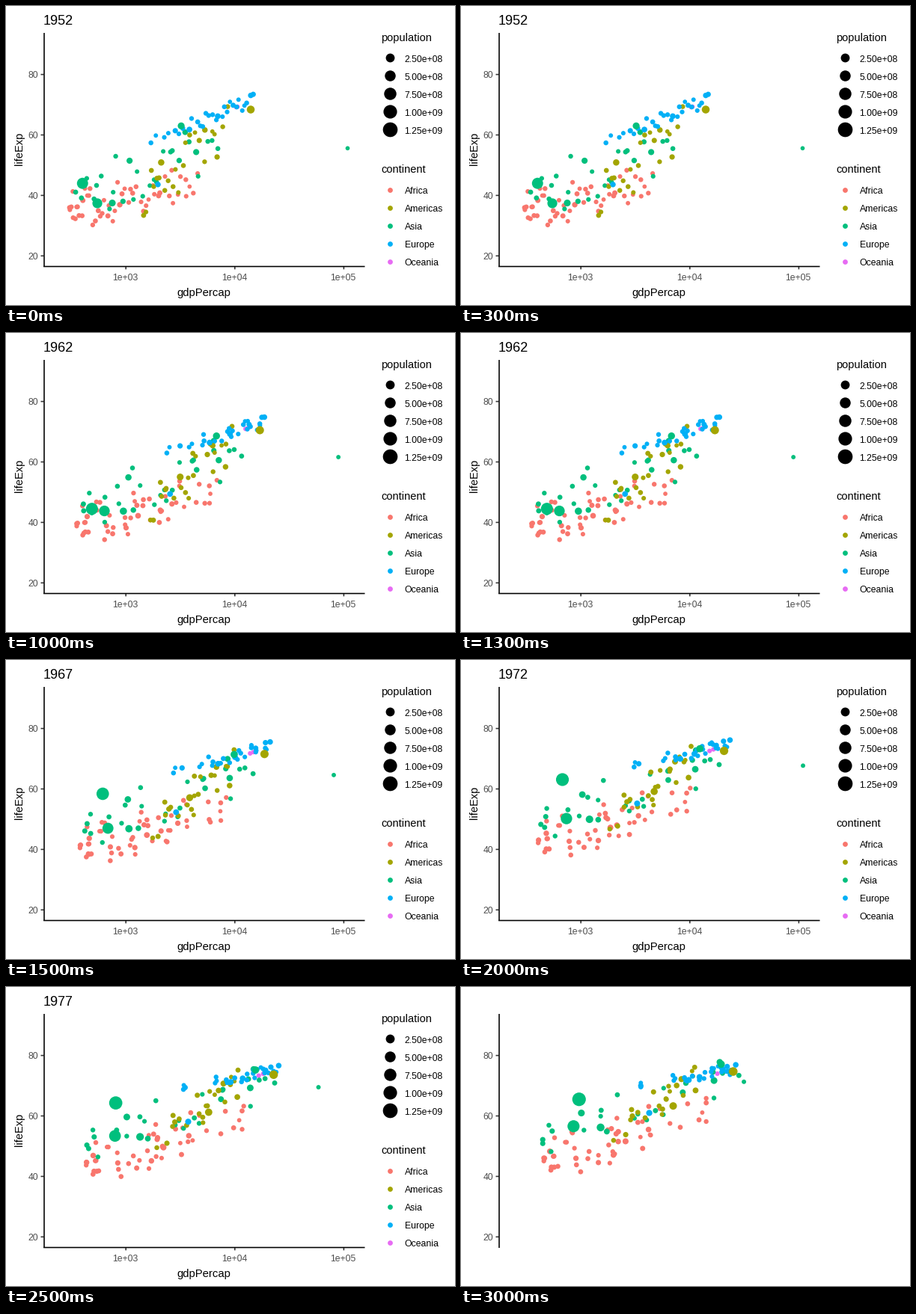
Recreate the animation shown at these times as a matplotlib script. Size 600 by 400 pixels, loop 3500 ms.

```python
import numpy as np
import matplotlib.pyplot as plt
from matplotlib.animation import FuncAnimation

W, H, DPI = 600, 400, 100
STEPS, STEP_MS = 7, 500
PT = 72 / DPI  # points per pixel

plt.rcParams["font.family"] = "Liberation Sans"
rng = np.random.default_rng(21)

COLORS = {
    "Africa": "#F8766D",
    "Americas": "#A3A500",
    "Asia": "#00BF7D",
    "Europe": "#00B0F6",
    "Oceania": "#E76BF3",
}


def to_x(log_income):
    return 160.2 + 145.6 * (log_income - 3)


def to_y(life):
    return 334.3 - 4.045 * (life - 20)


def radius(millions):
    return 2.75 + 0.2 * np.sqrt(millions)


def area(r):
    return (2 * r * PT) ** 2


def blend(start, end, power=1.0):
    """Ease from start to end, one row per step."""
    t = np.linspace(0, 1, STEPS)[:, None]
    return start + (end - start) * (1 - (1 - t) ** power)


groups = []  # (log income, life, millions, colour)


def add_cloud(name, count, before, after, skew, growth, power=1.1):
    """Spread dots along a rising band that drifts from before to after.

    A band is (lowest log income, highest, lowest life, highest, scatter).
    """
    rank = (np.arange(count) + rng.random(count)) / count
    final_rank = np.clip(rank + rng.normal(0, 0.1, count), 0, 1)
    luck = np.clip(rng.normal(0, 1, count), -1.8, 1.8)

    def place(band, u):
        low, high, short, long, scatter = band
        wealth = u ** skew
        return (low + (high - low) * wealth,
                short + (long - short) * wealth + scatter * luck)

    g0, l0 = place(before, rank)
    g1, l1 = place(after, final_rank)
    pop = np.minimum(rng.lognormal(1.5, 1, count), 45)
    order = rng.permutation(count)
    groups.append((blend(g0, g1, power)[:, order],
                   blend(l0, l1, power)[:, order],
                   blend(pop, pop * growth)[:, order], COLORS[name]))


def add_path(name, keys, pop):
    """One country moving through (step, income, life) key points."""
    step, income, life = np.array(keys).T
    at = np.arange(STEPS)
    groups.append((np.interp(at, step, np.log10(income))[:, None],
                   np.interp(at, step, life)[:, None],
                   np.linspace(*pop, STEPS)[:, None], COLORS[name]))


add_cloud("Oceania", 2, (4.0, 4.03, 69.1, 69.4, 0),
          (4.24, 4.3, 73.8, 74.7, 0), 1, 1.5)
add_cloud("Africa", 52, (2.48, 3.68, 36, 44, 4),
          (2.66, 4.15, 46, 62, 4.5), 1.4, 2)
add_cloud("Asia", 28, (2.52, 3.85, 38, 55, 6),
          (2.65, 4.45, 52, 73, 4.2), 1, 1.8)
add_cloud("Americas", 23, (3.15, 3.95, 43, 62, 5.5),
          (3.3, 4.15, 57, 74, 3), 1.1, 1.8)
add_cloud("Europe", 29, (3.15, 4.17, 56, 72, 1.3),
          (3.55, 4.45, 69.5, 76, 1), 0.65, 1.17, 1.5)

add_path("Asia", [(0, 750, 37.5), (6, 1517, 56.2)], (82, 153))
add_path("Asia", [(0, 400, 44), (1, 576, 50.5), (2, 488, 44.5),
                  (3, 613, 58.4), (4, 677, 63.1), (6, 962, 65.5)],
         (556, 1000))
add_path("Asia", [(0, 547, 37.4), (6, 856, 56.6)], (372, 708))
add_path("Asia", [(0, 3217, 63), (3, 9848, 71.4), (6, 19384, 77.1)],
         (86, 118))
add_path("Asia", [(0, 108382, 55.6), (3, 80895, 64.6), (4, 109348, 67.7),
                  (6, 31354, 71.3)], (0.2, 1.5))
add_path("Europe", [(0, 1969, 43.6), (6, 4241, 61)], (22, 47))
add_path("Americas", [(0, 2109, 50.9), (6, 7031, 63.3)], (57, 128))
add_path("Americas", [(0, 13990, 68.4), (6, 25010, 74.7)], (158, 232))

log_income, life, millions = (np.hstack([g[k] for g in groups])
                              for k in range(3))
dot_colors = [g[3] for g in groups for _ in range(g[0].shape[1])]
dot_x, dot_y, dot_area = to_x(log_income), to_y(life), area(radius(millions))

fig = plt.figure(figsize=(W / DPI, H / DPI), dpi=DPI, facecolor="white")
ax = fig.add_axes([0, 0, 1, 1])
ax.set_xlim(0, W)
ax.set_ylim(H, 0)
ax.axis("off")

fading = []  # everything missing from the last step


def label(x, y, text, px, color="black", **kw):
    return ax.text(x, y, text, fontsize=px * PT, color=color,
                   **{"va": "baseline", **kw})


def line(xs, ys, color="black"):
    return ax.plot(xs, ys, color=color, lw=1.6 * PT, snap=False,
                   solid_capstyle="butt")[0]


def dot(x, y, r, color):
    return ax.scatter([x], [y], s=area(r), c=[color], linewidths=0)


GREY, TICK = "#4D4D4D", "#333333"

for value in (20, 40, 60, 80):
    y = to_y(value)
    line([46.5, 50.5], [y, y], TICK)
    label(43, y + 4.7, str(value), 12.2, GREY, ha="right")
line([51, 51], [36, 349])

for power in (3, 4, 5):
    x = to_x(power)
    fading.append(line([x, x], [348.5, 352.3], TICK))
    fading.append(label(x - 0.7, 367, f"1e+0{power}", 12.2, GREY,
                        ha="center"))
fading.append(line([50.1, 479.5], [348.5, 348.5]))

title = label(50, 25, "", 18)
fading += [
    title,
    label(264.6, 388, "gdpPercap", 14.9, ha="center"),
    label(25, 190.8, "lifeExp", 14.67, rotation=90, ha="right",
          va="center"),
    label(501, 47, "population", 14.67),
    label(501, 223, "continent", 14.67),
]

for k in range(5):
    y, pop = 69.3 + 24 * k, 2.5e8 * (k + 1)
    fading.append(dot(513.3, y, radius(pop / 1e6), "black"))
    fading.append(label(532.5, y + 5.6, f"{pop:.2e}", 12.2))
for k, (name, color) in enumerate(COLORS.items()):
    y = 246 + 24 * k
    fading.append(dot(513.3, y, 3.4, color))
    fading.append(label(532.5, y + 5, name, 12.2))

dots = ax.scatter(dot_x[0], dot_y[0], s=dot_area[0], c=dot_colors,
                  linewidths=0, zorder=3)


def update(step):
    dots.set_offsets(np.column_stack([dot_x[step], dot_y[step]]))
    dots.set_sizes(dot_area[step])
    title.set_text(str(1952 + 5 * step))
    for artist in fading:
        artist.set_visible(step < STEPS - 1)
    return [dots, *fading]


anim = FuncAnimation(fig, update, frames=STEPS, interval=STEP_MS,
                     repeat=True, repeat_delay=0, blit=False)
plt.show()
```
